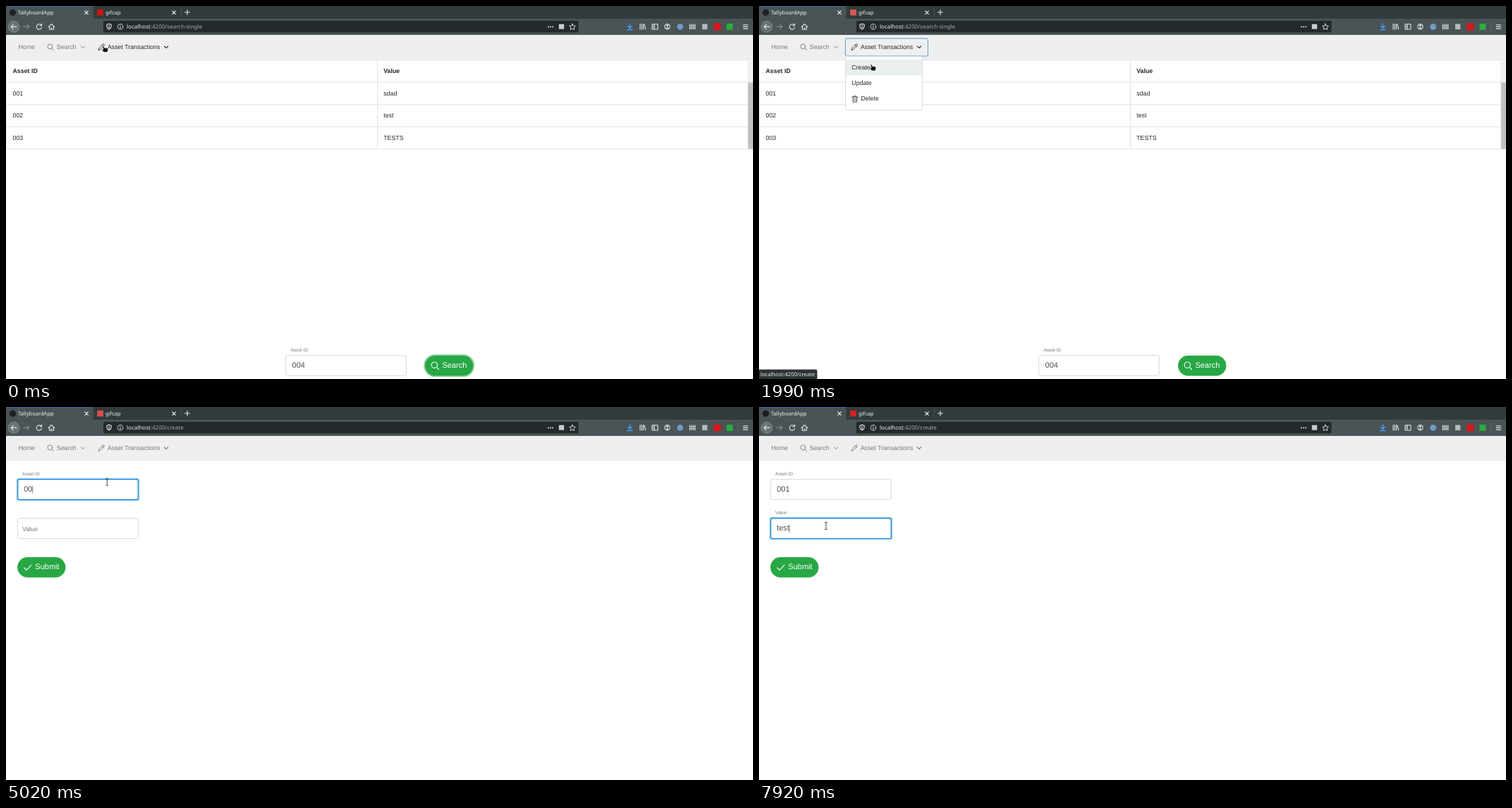
Animation, 1059 px wide and 529 px high, one loop 8000 ms. Source, as an HTML page:

```html
<!DOCTYPE html>
<html lang="en">
<head>
<meta charset="utf-8">
<title>Asset form</title>
<style>
html, body { margin: 0; width: 100%; height: 100%; overflow: hidden; background: #fff; }
svg { display: block; width: 1059px; height: 529px; text-rendering: geometricPrecision; }
text { font-family: "Liberation Sans", Arial, sans-serif; font-size: 8.825px; fill: #212529; white-space: pre; }
.ui text { font-family: "Noto Sans", sans-serif; font-size: 7.55px; fill: #eef0f0; }
.ui text.url { font-size: 8.02px; }
.dim { fill: #a4abac; }
.line { fill: none; stroke: #e4e7e7; stroke-width: 1.1; stroke-linecap: round; stroke-linejoin: round; }
.nav text { fill: #777; }
.nav .line { stroke: #777; stroke-width: .9; }
.nav .on text { fill: #292929; }
.nav .on .line { stroke: #292929; }
.grid { fill: none; stroke: #dee2e6; stroke-width: 1; }
.box { fill: #fff; stroke: #ced4da; stroke-width: .9; }
.big { font-size: 11.03px; fill: #495057; }
.small { font-size: 6.62px; fill: #777; }
.label { fill: #777; }
.btn text { font-size: 11.03px; fill: #fff; }
.btn .line { stroke: #fff; }
.ring { fill: none; stroke: #28a745; stroke-width: 1.8; opacity: .5; }
.caret { stroke: #495057; stroke-width: .7; }
</style>
</head>
<body>
<svg viewBox="0 0 1059 529">
  <rect width="1059" height="529" fill="#fff"/>

  <g class="ui">
    <rect width="1059" height="41" fill="#4a5355"/>
    <rect x="123.5" width="935.5" height="18" fill="#323b3d"/>
    <rect width="123.5" height="1" fill="#2a6da6"/>
    <circle cx="9.5" cy="9.3" r="4.6" fill="#1d2122"/>
    <text x="17" y="12">TallyboardApp</text>
    <rect id="icon" x="129.2" y="5" width="8.8" height="8.4"/>
    <text x="141" y="12">gifcap</text>
    <path class="line" d="M111.8 7l4.6 4.6m0-4.6l-4.6 4.6M235.8 7l4.6 4.6m0-4.6l-4.6 4.6M253.5 9h7m-3.5-3.5v7"/>
    <path d="M248.5 3v12" stroke="#596263" stroke-width=".7"/>

    <circle cx="11" cy="29.4" r="8" fill="#697173" stroke="#899092" stroke-width=".8"/>
    <path class="line" d="M15 29.4H7.3m3-3.2l-3.2 3.2 3.2 3.2"/>
    <path class="line" d="M25 29.4h7.7m-3-3.2l3.2 3.2-3.2 3.2" style="stroke:#838b8c"/>
    <path class="line" d="M50 27.2a3.7 3.7 0 1 0 .6 3.2M50.6 25v2.7h-2.7"/>
    <path class="line" d="M60.2 29.6l4.3-4.1 4.3 4.1M61.6 29.2v4h5.8v-4M64.5 33v-2.3"/>

    <rect x="138" y="21" width="673.5" height="16.6" rx="1.8" fill="#242a2c"/>
    <path class="line" d="M143 26.2l3.1-1 3.1 1v2.6q-.5 3-3.1 4.2-2.6-1.2-3.1-4.2zM146.1 27v4"/>
    <circle class="line" cx="162" cy="29.3" r="3.8" style="stroke-width:.8"/>
    <path class="line" d="M162 29v2.2m0-4.1v.1"/>
    <text class="url" x="171" y="32.2">localhost<tspan class="dim">:4200/<tspan id="path">search-single</tspan></tspan></text>
    <g fill="#e4e7e7"><circle cx="769" cy="29.4" r="1"/><circle cx="772.1" cy="29.4" r="1"/><circle cx="775.2" cy="29.4" r="1"/></g>
    <rect x="783.8" y="25.7" width="7.4" height="7" fill="#c9cdcd"/>
    <path class="line" d="M803 25.2l1.3 2.8 3 .4-2.2 2.1.6 3-2.7-1.5-2.7 1.5.6-3-2.2-2.1 3-.4z" style="stroke-width:.9"/>

    <path class="line" d="M884.5 25v6m-3-2.8l3 3 3-3M880.8 33.5h7.4" style="stroke:#45a1ff;stroke-width:1.3"/>
    <path class="line" d="M899 25.5v7.5m2.3-7.5v7.5m2.3-7.5v7.5m1.2-7l2 6.8"/>
    <path class="line" d="M916 25.8h8v7.2h-8zM919.2 26v7M917.3 28h.6m-.6 2h.6"/>
    <circle class="line" cx="937.5" cy="29.3" r="3.7"/>
    <path d="M935.3 32a2.3 2 0 0 1 4.4 0z" fill="#e4e7e7"/><circle cx="937.5" cy="28" r="1.4" fill="#e4e7e7"/>
    <circle cx="955.7" cy="29.3" r="4.4" fill="#6f9cc4"/>
    <path class="line" d="M969.5 25.8v7.2m2.4-7.2v7.2m2.4-7.2v7.2m2.4-7.2v7.2M968.7 27.8h8.8m-8.8 3.2h8.8" style="stroke-width:.9"/>
    <rect x="987" y="25.5" width="7.4" height="7.6" fill="#b5b9ba"/>
    <rect x="1003.3" y="24.5" width="10" height="10" fill="#d3171b"/>
    <rect x="1021.5" y="25" width="8.8" height="8.8" fill="#25b03a"/>
    <path d="M1037.5 22v14" stroke="#697173" stroke-width=".7"/>
    <path class="line" d="M1045.2 26.7h6.4m-6.4 2.7h6.4m-6.4 2.7h6.4"/>
  </g>

  <g class="nav">
    <rect y="41" width="1059" height="35.3" fill="#efefef"/>
    <text x="17.5" y="61">Home</text>
    <circle class="line" cx="62.4" cy="57.4" r="3.4"/>
    <path class="line" d="M64.9 60l2.7 2.7M106.3 57l2.7 2.7 2.7-2.7"/>
    <text x="71.8" y="61">Search</text>
    <rect id="navFocus" x="122.5" y="46" width="117" height="25" rx="1.6" fill="none" stroke="#5b9bd5"/>
    <g id="assets">
      <path class="line" d="M131.2 62.5l.8-3 5.3-5.3q1-.7 1.8.2.8.8 0 1.7l-5.2 5.3zM136.2 55.3l2 2"/>
      <text x="143.9" y="61">Asset Transactions</text>
      <path class="line" d="M224.3 57l2.7 2.7 2.7-2.7" style="stroke-width:1.1"/>
    </g>
  </g>

  <g id="listPage">
    <path class="grid" d="M.3 203V76.5H1052V203M526.5 76.5V203M0 139.8h1052M0 171.3h1052M0 202.9h1052"/>
    <path class="grid" d="M0 108h1052" style="stroke-width:1.2"/>
    <rect x="1052" y="76.3" width="7" height="126.7" fill="#f0f0f0"/>
    <rect x="1052" y="108.5" width="7" height="94.5" fill="#c1c1c1"/>
    <g id="rows"></g>
    <text class="small" x="403.4" y="490.4">Asset ID</text>
    <rect class="box" x="396.7" y="495.8" width="170.6" height="28.6" rx="2.2"/>
    <text class="big" x="405.5" y="513.4">004</text>
    <g class="btn">
      <rect id="searchRing" class="ring" x="593.1" y="494.8" width="70.2" height="30.4" rx="15.2"/>
      <rect x="594" y="495.7" width="68.4" height="28.7" rx="14.3" fill="#28a745"/>
      <circle class="line" cx="607.3" cy="509.2" r="4.2"/>
      <path class="line" d="M610.4 512.3l3.2 3.2"/>
      <text x="618.4" y="513.4">Search</text>
    </g>
    <g id="menu">
      <rect x="122.5" y="71.5" width="109" height="76" rx="1.8" fill="#fff" stroke="#d5d5d5" stroke-width=".8"/>
      <rect id="hover" x="123" y="76" width="108.2" height="22.4" fill="#e9eeee"/>
      <text x="131.3" y="90.1">Create</text>
      <text x="131.3" y="112.2">Update</text>
      <text x="144.4" y="134.3">Delete</text>
      <path class="line" d="M131.8 129h8.2m-5.6 0v-1.3h3V129M132.8 129l.4 7.3h5.4l.4-7.3m-4.3 2v3.5m2.4-3.5v3.5" style="stroke:#333;stroke-width:.8"/>
    </g>
  </g>

  <g id="formPage">
    <g id="fields"></g>
    <g class="btn">
      <rect x="16.2" y="213" width="68.2" height="28.7" rx="14.3" fill="#28a745"/>
      <path class="line" d="M25.8 228l3.3 3.3 6.8-7.2"/>
      <text x="41.3" y="230.4">Submit</text>
    </g>
  </g>

  <g id="status" class="ui">
    <path d="M0 515.5h80.5q2 0 2 2V529H0z" fill="#2b3234"/>
    <text x="2" y="525" style="font-size:7.68px">localhost:4200/create</text>
  </g>

  <g id="cursor">
    <path id="hand" d="M-2.9-4.2q.9-.9 1.7.1l.8 2.4 3.2.2q1.7.2 1.9 1.6v2.1L3.7 4.5h-4.6L-3.7 1.4q-.4-1 .7-1L-1.9 1z" fill="#111" stroke="#fff" stroke-width=".5"/>
    <path id="arrow" d="M-2-5v8.6l2-1.9 1.4 3 1.3-.6L1.4 1.3H4z" fill="#111" stroke="#fff" stroke-width=".6"/>
    <path id="beam" d="M-2-5h1.4l.6.5.6-.5H2M-2 5h1.4l.6-.5.6.5H2M0-4.5v9" fill="none" stroke="#333" stroke-width=".9"/>
  </g>
</svg>

<script>
const LOOP = 8000;
const PAGE = 2010;
const $ = id => document.getElementById(id);
const show = (id, on) => { $(id).style.display = on ? "" : "none"; };
const clamp = v => Math.min(1, Math.max(0, v));
const mix = (a, b, p) => a + (b - a) * p;
const ease = p => p * p * (3 - 2 * p);
const ramp = (t, start, length) => ease(clamp((t - start) / length));
// last row whose time has passed
const at = (t, steps) => steps.filter(s => s[0] <= t).pop();

const cursorSteps = [
  [0, 139.8, 61, "hand"], [100, 144, 61, "hand"], [200, 152, 61, "hand"],
  [300, 158, 61, "hand"], [410, 161, 61, "hand"], [600, 161, 64.5, "hand"],
  [1430, 161, 70, "hand"], [1530, 161, 80, "hand"], [1630, 161, 87.3, "hand"],
  [PAGE, 161, 87.3, "arrow"], [2790, 158, 90, "arrow"], [2880, 151, 97, "arrow"],
  [2970, 146, 104, "beam"], [3060, 143.9, 106, "beam"], [3150, 143.3, 106.3, "beam"],
  [6300, 138, 114, "beam"], [6390, 124, 138, "arrow"], [6480, 107, 157, "arrow"],
  [6570, 97, 167, "beam"], [6660, 95, 168.5, "beam"]
];

// caret: x offset follows the typed text, [time, text, caret shown]
const fields = [
  { name: "Asset ID", y: 102.7, from: 3150, to: 6660,
    typed: [[0, "", 1], [4440, "0", 1], [4630, "00", 1], [5560, "00", 0], [5770, "001", 1]] },
  { name: "Value", y: 157.9, from: 6660, to: Infinity,
    typed: [[0, "", 1], [7150, "t", 1], [7250, "te", 1], [7650, "tes", 1], [7830, "test", 1]] }
];
const advance = { 0: 6.13, 1: 6.13, t: 3.07, e: 6.13, s: 5.52 };

$("rows").innerHTML = [["Asset ID", "Value"], ["001", "sdad"], ["002", "test"], ["003", "TESTS"]]
  .map(([id, value], i) => {
    const y = i ? 95.2 + i * 31.55 : 94.5;
    const weight = i ? "normal" : "bold";
    return `<g font-weight="${weight}"><text x="9.5" y="${y}">${id}</text><text x="535.2" y="${y}">${value}</text></g>`;
  }).join("");

$("fields").innerHTML = fields.map(({ name, y }, i) => `
  <rect id="glow${i}" x="15.7" y="${y - 1}" width="172.6" height="30.6" rx="2.8" fill="none" stroke="#55b0ee" stroke-width="2" opacity="0"/>
  <rect class="box" x="16.7" y="${y}" width="170.6" height="28.6" rx="2.2"/>
  <rect id="edge${i}" x="16.7" y="${y}" width="170.6" height="28.6" rx="2.2" fill="none" stroke="#1f86d2" stroke-width="1.2" opacity="0"/>
  <text id="label${i}" class="label" x="23">${name}</text>
  <text id="value${i}" class="big" x="25.2" y="${y + 17.4}"></text>
  <path id="caret${i}" class="caret" d="M0 ${y + 9}v11"/>`).join("");

function drawField(f, i, t) {
  const float = ramp(t, f.from, 200);
  const focus = ramp(t, f.from, 150) - ramp(t, f.to, 150);
  const [, text, caret] = at(t, f.typed);
  $("glow" + i).style.opacity = focus * .6;
  $("edge" + i).style.opacity = focus;
  $("label" + i).style.fontSize = mix(8.825, 6.62, float) + "px";
  $("label" + i).setAttribute("y", f.y + mix(17.7, -5.6, float));
  $("value" + i).textContent = text;
  const x = [...text].reduce((sum, c) => sum + advance[c], 25.6);
  $("caret" + i).setAttribute("transform", `translate(${x} 0)`);
  show("caret" + i, caret && t >= f.from && t < f.to);
}

function iconFade(t) {
  const beat = Math.floor((t - 960) / 1340);
  if (beat < 0) return 0;
  const p = clamp((t - 960 - beat * 1340) / 340);
  return beat % 2 ? 1 - p : p;
}

function draw(t) {
  const list = t < PAGE;
  const [, x, y, shape] = at(t, cursorSteps);
  const pale = iconFade(t);
  show("listPage", list);
  show("formPage", !list);
  show("navFocus", t >= 600 && list);
  show("menu", t >= 700);
  show("hover", t >= 1530);
  show("status", t >= 1630 && t < 2110);
  $("assets").setAttribute("class", list ? "on" : "");
  $("path").textContent = list ? "search-single" : "create";
  $("searchRing").style.opacity = .5 * (1 - ramp(t, 600, 150));
  $("icon").setAttribute("fill", `rgb(${mix(205, 218, pale)},${mix(22, 88, pale)},${mix(18, 84, pale)})`);
  fields.forEach((f, i) => drawField(f, i, t));
  $("cursor").setAttribute("transform", `translate(${x} ${y})`);
  for (const id of ["hand", "arrow", "beam"]) show(id, id === shape);
}

const start = performance.now();
function tick() {
  draw((performance.now() - start) % LOOP);
  requestAnimationFrame(tick);
}
tick();
</script>
</body>
</html>
```
